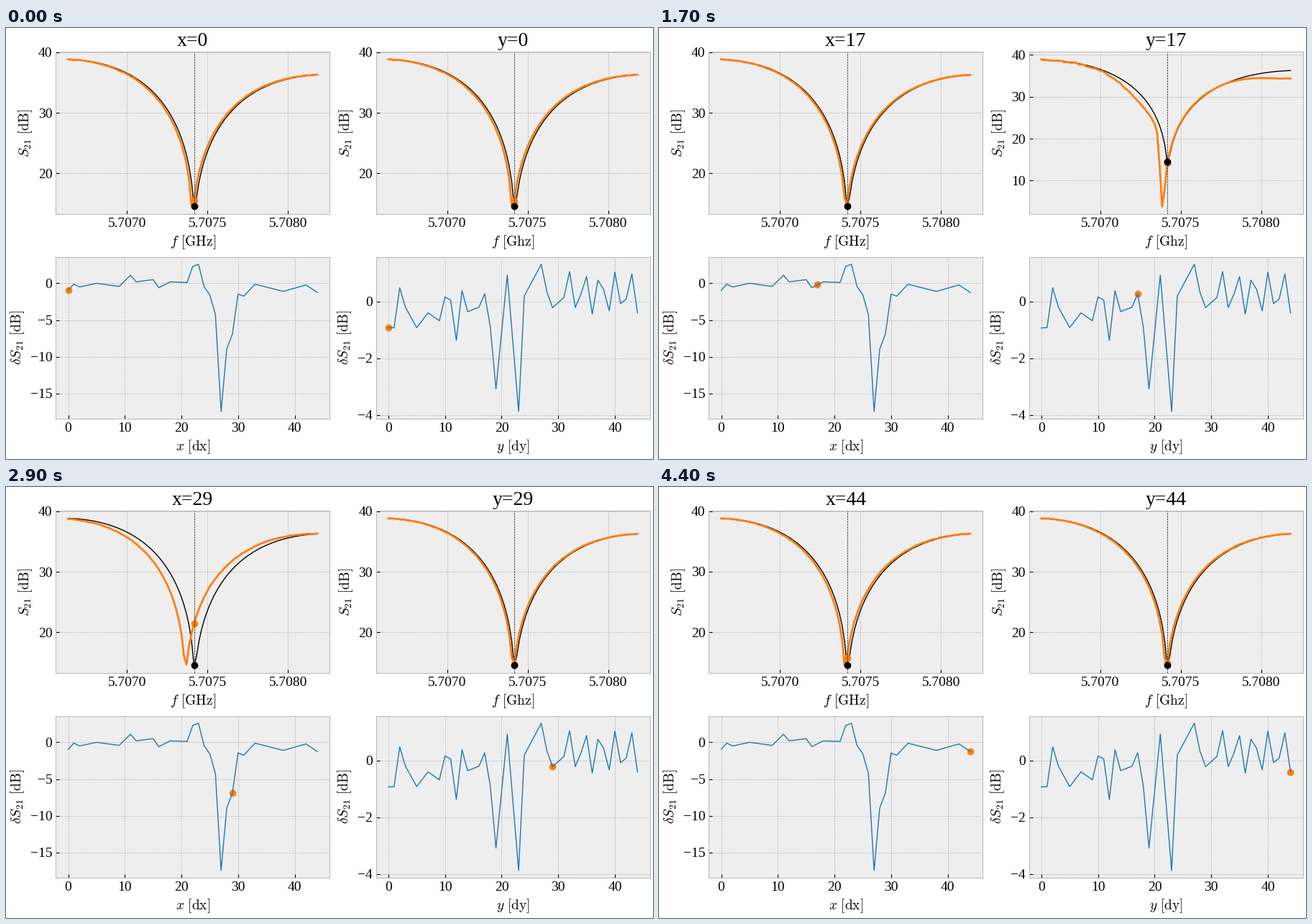
A matplotlib script for the animation above (4.5 s loop, 900 by 600 pixels).

```python
import numpy as np
import matplotlib.pyplot as plt
from matplotlib.animation import FuncAnimation
from matplotlib.ticker import FormatStrFormatter

plt.rcParams.update({
    "font.family": "Liberation Serif", "font.size": 14,
    "mathtext.fontset": "cm",
    "axes.facecolor": "#eeeeee", "axes.edgecolor": "#bcbcbc",
    "axes.grid": True, "axes.axisbelow": True,
    "axes.titlesize": 20, "axes.labelsize": 14,
    "grid.color": "#b2b2b2", "grid.linestyle": "--", "grid.linewidth": 0.5,
    "xtick.direction": "in", "ytick.direction": "in",
})
W, H, STEPS = 900, 600, 45
AX_W, AX_H, TOP, LOW = 381.2, 225.5, 33.2, 318.6
BLUE, ORANGE = "#1f77b4", "#ff7f0e"

DIP, FLOOR = 50, 14.54
LEFT_TOP, RIGHT_TOP = 38.87, 36.3
REACH, STEEP = 7.3, 0.51
idx = np.arange(100)
steps = np.arange(STEPS)
freq = np.linspace(5.706635, 5.708182, idx.size)


def notch(i):
    """Resonance in dB: each flank is a parabola in the root of the distance."""
    d = i - DIP
    top = np.where(d < 0, LEFT_TOP, RIGHT_TOP)
    return np.maximum(top - STEEP * (REACH - np.sqrt(np.abs(d))) ** 2, FLOOR)


def shift_for(rise):
    """Distance at which the right flank lies `rise` dB above the floor."""
    return (REACH - np.sqrt((RIGHT_TOP - FLOOR - rise) / STEEP)) ** 2


def through(*points):
    return np.interp(steps, *zip(*points))


def bumps(shapes):
    return sum(h * np.exp(-((idx - c) / w) ** 2 / 2) for c, w, h in shapes)


# Depth change at the resonance for every probe position
delta_x = through((0, -.95), (1, -.1), (2, -.5), (5, 0), (9, -.42), (11, 1.1),
                  (12, .2), (15, .5), (16, -.6), (18, .2), (21, .12),
                  (22, 2.3), (23, 2.6), (24, -.45), (25, -1.55), (26, -4.25),
                  (27, -17.45), (28, -8.95), (29, -6.9), (30, -1.45),
                  (31, -1.75), (33, -.12), (38, -1.1), (42, -.22), (44, -1.25))
delta_y = through((0, -.93), (1, -.92), (2, .48), (3, -.2), (5, -.92),
                  (7, -.4), (9, -.68), (10, .16), (11, .05), (12, -1.37),
                  (13, .38), (14, -.36), (16, -.2), (17, .27), (18, -.9),
                  (19, -3.08), (21, .93), (23, -3.87), (24, .19), (27, 1.31),
                  (28, .33), (29, -.22), (31, .14))
ripple = 0.3 + 0.75 * np.cos(2 * np.pi * (steps - 32) / 2.7)
delta_y = np.where(steps > 31, ripple, delta_y)

# A second mode crosses the notch around one position: (centre, width, loss)
mode_x = 25, bumps([(24, 15, 3.3), (41, 4, -4.7), (48, 1.2, 3), (57, 9, -1.5)])
mode_y = 17, bumps([(40, 8, 1.9), (48, .85, 15), (99, 12, 1.9)])

base = notch(idx)


def response(n, delta, mode):
    rng = np.random.default_rng(n)
    at, loss = mode
    weight = max(0, 1 - abs(n - at) / 2)
    y = notch(idx + shift_for(-delta[n])) - weight * loss
    y += (0.04 + 0.14 * weight * (idx < 38)) * rng.uniform(-1, 1, idx.size)
    y[DIP] = FLOOR - delta[n]
    return y


def padded(lo, hi):
    pad = 0.05 * (hi - lo)
    return lo - pad, hi + pad


fig = plt.figure(figsize=(W / 100, H / 100), dpi=100, facecolor="white")


def add_axes(x, y, xlabel, ylabel):
    ax = fig.add_axes([x / W, 1 - (y + AX_H) / H, AX_W / W, AX_H / H])
    ax.set_xlabel(xlabel)
    ax.set_ylabel(ylabel)
    return ax


class Panel:
    def __init__(self, name, x, unit, delta, mode):
        self.name, self.delta = name, delta
        self.curves = [response(n, delta, mode) for n in steps]

        self.top = ax = add_axes(x, TOP, rf"$f\ \rm{{[{unit}]}}$",
                                 r"$S_{21}\ \rm{[dB]}$")
        ax.plot(freq, base, color="black", lw=1)
        self.line, = ax.plot(freq, base, color=ORANGE, lw=2)
        self.dot, = ax.plot([freq[DIP]], [FLOOR], "o", color=ORANGE, ms=6)
        ax.plot([freq[DIP]], [FLOOR], "o", color="black", ms=6)
        ax.axvline(freq[DIP], color="black", ls="--", lw=0.5)
        ax.set_xticks([5.7070, 5.7075, 5.7080])
        ax.xaxis.set_major_formatter(FormatStrFormatter("%.4f"))
        ax.set_xlim(padded(freq[0], freq[-1]))

        low = add_axes(x, LOW, rf"${name}\ \rm{{[d{name}]}}$",
                       r"$\delta S_{21}\ \rm{[dB]}$")
        self.mark, = low.plot([0], [delta[0]], "o", color=ORANGE, ms=6)
        low.plot(steps, delta, color=BLUE, lw=1)
        low.set_xlim(padded(0, STEPS - 1))
        low.set_ylim(padded(delta.min(), delta.max()))

    def show(self, n):
        y = self.curves[n]
        self.line.set_ydata(y)
        self.dot.set_ydata([y[DIP]])
        self.mark.set_data([n], [self.delta[n]])
        self.top.set_ylim(padded(min(y.min(), FLOOR), max(y.max(), base.max())))
        self.top.set_title(f"{self.name}={n}")


panels = [Panel("x", 69.2, "GHz", delta_x, mode_x),
          Panel("y", 514.6, "Ghz", delta_y, mode_y)]


def update(n):
    for p in panels:
        p.show(n)
    return []


anim = FuncAnimation(fig, update, frames=STEPS, interval=100,
                     repeat=True, repeat_delay=0, blit=False)
plt.show()
```
